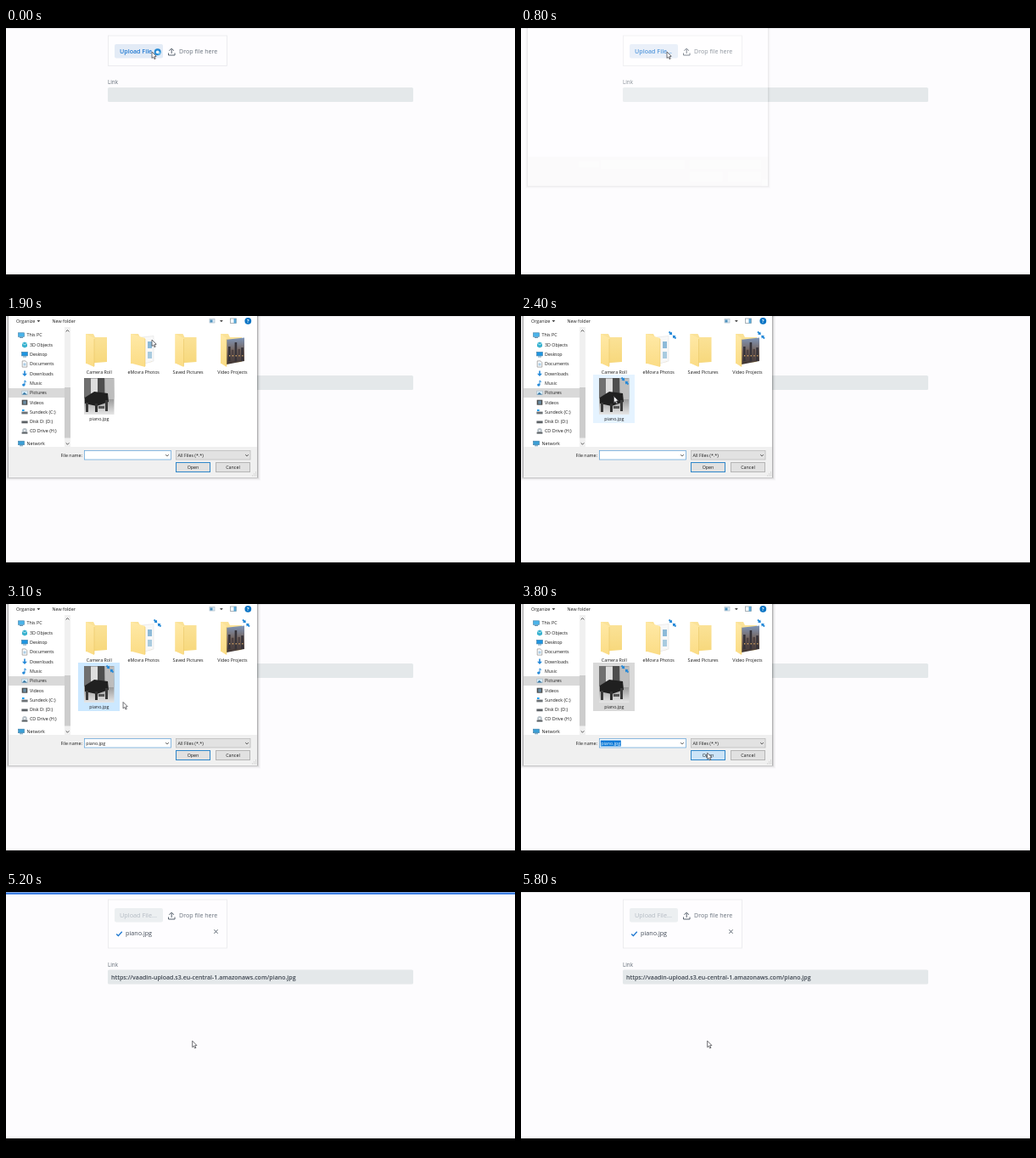
An HTML page with a canvas for the animation above (6100 ms loop, 600 px wide and 306 px high).

```html
<!DOCTYPE html>
<html lang="en">
<head>
<meta charset="utf-8">
<title>File upload</title>
<style>
  html, body { margin: 0; width: 100%; height: 100%; overflow: hidden; background: #fdfcfe; }
  canvas { display: block; width: 600px; height: 306px; }
</style>
</head>
<body>
<canvas id="stage" width="600" height="306"></canvas>
<script>
const ctx = document.getElementById('stage').getContext('2d');
const LOOP = 6100, STEP = 100;
const FONT = '"Open Sans", "Noto Sans", sans-serif';
const BLUE = '#1f78d1';

const clamp = v => Math.max(0, Math.min(1, v));
const span = (t, from, to) => clamp((t - from) / (to - from));
const ease = p => p * p * (3 - 2 * p);
const mix = (a, b, p) => a + (b - a) * p;

function rect(x, y, w, h, fill, stroke, line = 0.7) {
  if (fill) { ctx.fillStyle = fill; ctx.fillRect(x, y, w, h); }
  if (stroke) { ctx.strokeStyle = stroke; ctx.lineWidth = line; ctx.strokeRect(x, y, w, h); }
}

function rounded(x, y, w, h, r, fill) {
  ctx.fillStyle = fill;
  ctx.beginPath();
  ctx.roundRect(x, y, w, h, r);
  ctx.fill();
}

function poly(points, fill, stroke, line = 0.8, close = true) {
  ctx.beginPath();
  points.forEach(([x, y]) => ctx.lineTo(x, y));
  if (close) ctx.closePath();
  if (fill) { ctx.fillStyle = fill; ctx.fill(); }
  if (stroke) { ctx.strokeStyle = stroke; ctx.lineWidth = line; ctx.stroke(); }
}

const path = (points, color, line) => poly(points, null, color, line, false);

function disc(x, y, r, fill) {
  ctx.fillStyle = fill;
  ctx.beginPath();
  ctx.arc(x, y, r, 0, Math.PI * 2);
  ctx.fill();
}

function fade(y, h, ...colors) {
  const gradient = ctx.createLinearGradient(0, y, 0, y + h);
  colors.forEach((color, i) => gradient.addColorStop(i / (colors.length - 1), color));
  return gradient;
}

function text(str, x, y, size, color, weight = 400, align = 'left') {
  ctx.font = `${weight} ${size}px ${FONT}`;
  ctx.textAlign = align;
  ctx.textBaseline = 'alphabetic';
  ctx.fillStyle = color;
  ctx.fillText(str, x, y + size * 0.35);
}

const label = (str, x, y, align) => text(str, x, y, 5.35, '#1c1c1c', 400, align);
const chevron = (x, y, dir, color = '#444') =>
  path([[x - 1.8, y - dir], [x, y + dir], [x + 1.8, y - dir]], color, 0.9);

// ---- page ----

function uploadPanel(t, height) {
  rect(120.5, 9, 140, height, '#fefdff', '#e8e8ec', 0.8);
  const idle = t < 4500;
  rounded(128, 19, 57, 16.5, 2, idle ? '#e3ebf6' : '#eceff1');
  text('Upload File...', 134, 27.3, idle ? 7.1 : 7.3, idle ? BLUE : '#b4bbc3', idle ? 600 : 400);
  path([[191.5, 29.5], [191.5, 32], [199, 32], [199, 29.5]], '#59636f', 1);
  path([[195.2, 30], [195.2, 25]], '#59636f', 1);
  path([[192.4, 26.8], [195.2, 24], [198, 26.8]], '#59636f', 1);
  text('Drop file here', 204, 27.3, 7.1, '#69727d');
}

function fileRow(t) {
  text('piano.jpg', 141, 48.3, 7.2, '#424b57');
  path([[245.4, 44.4], [249.6, 48.8]], '#59636f', 1);
  path([[249.6, 44.4], [245.4, 48.8]], '#59636f', 1);
  if (t >= 5200) {
    path([[130.2, 49.4], [132.4, 51.6], [136.7, 46.7]], BLUE, 1.4);
    return;
  }
  text('Processing File...', 141, 59.8, 6.15, '#6b747f');
  rect(141, 68.4, 99, 1.2, '#d6dade');
  const p = span(t, 4500, 5200);
  rect(141 + 95 * p * p, 68.2, mix(4, 22, Math.sin(p * Math.PI)), 1.7, '#2b91c9');
}

function page(t) {
  rect(0, 0, 600, 306, '#fdfcfe');
  rect(0, 0, 600, 1, '#e7e7ea');
  rect(0, 290, 600, 16, '#000');

  const uploading = t >= 4500 && t < 5200, done = t >= 5200;
  const shift = uploading ? 40.5 : done ? 21.5 : 0;
  uploadPanel(t, 35.5 + shift);
  if (t >= 4500) fileRow(t);
  text('Link', 120, 63.8 + shift, 6.3, '#5f6873', 500);
  rounded(120, 70 + shift, 360, 17, 1.5, '#e4e8ea');
  if (done) {
    text('https://vaadin-upload.s3.eu-central-1.amazonaws.com/piano.jpg', 124, 100.5, 7, '#3a424d', 600);
  }

  if (t >= 4700) {
    ctx.globalAlpha = 1 - span(t, 5200, 5700);
    const width = done ? 600 : 330 * (1 - (1 - span(t, 4600, 5100)) ** 2);
    rect(0, 0.5, width, 2.3, '#2f74e0');
    ctx.globalAlpha = 1;
  }
}

// ---- file dialog ----

const PLACES = ['This PC', '3D Objects', 'Desktop', 'Documents', 'Downloads', 'Music',
  'Pictures', 'Videos', 'Sundeck (C:)', 'Disk D: (D:)', 'CD Drive (H:)'];

function blankIcon(x, y) {
  poly([[x - 2.8, y - 3.6], [x + 1, y - 3.6], [x + 2.8, y - 1.8], [x + 2.8, y + 3.6], [x - 2.8, y + 3.6]],
    '#fff', '#8d8d8d', 0.7);
}

function screenIcon(x, y, color) {
  rect(x - 3.5, y - 2.8, 7, 4.5, color, '#3f7ea6', 0.6);
  rect(x - 2, y + 2.4, 4, 0.8, '#3f7ea6');
}

function pictureIcon(x, y) {
  rect(x - 3.3, y - 2.3, 6.6, 4.6, '#d8ecf8', '#a9b8c2', 0.6);
  poly([[x - 3, y + 2], [x - 0.5, y - 0.6], [x + 3, y + 2]], '#3779a5');
}

const ICONS = [
  (x, y) => screenIcon(x, y, '#4ab4ea'),
  (x, y) => {
    poly([[x, y - 3.5], [x + 3, y - 1.8], [x + 3, y + 2], [x, y + 3.5], [x - 3, y + 2], [x - 3, y - 1.8]], '#39b2cf');
    path([[x - 3, y - 1.8], [x, y], [x + 3, y - 1.8]], '#d9f5fb', 0.7);
  },
  (x, y) => screenIcon(x, y, '#1e96e2'),
  (x, y) => { blankIcon(x, y); rect(x - 1.5, y - 0.8, 3, 0.7, '#4a8fc4'); rect(x - 1.5, y + 1, 3, 0.7, '#4a8fc4'); },
  (x, y) => {
    path([[x, y - 3.3], [x, y + 1]], '#2589d8', 1.6);
    poly([[x - 3, y], [x + 3, y], [x, y + 3.2]], '#2589d8');
  },
  (x, y) => { disc(x - 1.2, y + 2, 1.7, '#2589d8'); path([[x, y + 2], [x, y - 3.2], [x + 2, y - 1.4]], '#2589d8', 1); },
  pictureIcon,
  (x, y) => { rect(x - 3.3, y - 3, 6.6, 6, '#4c4c4c'); rect(x - 1.8, y - 2, 3.6, 4, '#6b8da3'); },
  (x, y) => { rect(x - 3.6, y - 0.4, 7.2, 2.8, '#6b7175'); rect(x - 3, y - 3, 2.6, 2, '#24a0ed'); },
  (x, y) => rect(x - 3.6, y - 0.8, 7.2, 2.8, '#5c6266'),
  (x, y) => { disc(x, y - 0.7, 2.8, '#b7c1c8'); disc(x, y - 0.7, 0.9, '#fff'); rect(x - 3.4, y + 1, 6.8, 2, '#5c6266'); }
];

function sidebar(loaded) {
  rect(3, 85, 66, 11, '#d9d9d9');
  PLACES.forEach((name, i) => {
    const y = 22.6 + i * 11.3, root = i === 0;
    if (loaded) ICONS[i](root ? 18 : 22, y);
    else if (i === 6) pictureIcon(22, y);
    else if (!root) blankIcon(22, y);
    label(name, root ? 24.5 : 28, y);
  });
  if (loaded) screenIcon(18, 150, '#3b9fd6');
  label('Network', 24.5, 150.6);
  rect(69, 13, 7, 141, '#f0f0f0');
  rect(69, 84, 7, 59.5, '#cdcdcd');
  chevron(72.5, 17.5, -0.9);
  chevron(72.5, 150.3, 0.9);
}

function toolbar() {
  label('Organize', 12, 5.8);
  poly([[36.5, 5], [40.3, 5], [38.4, 7.2]], '#444');
  label('New folder', 54.5, 5.8);
  rect(240, 3.5, 6, 4.5, '#dceaf4', '#a3b5c2', 0.6);
  rect(240.5, 4.5, 3, 3, '#4e91bd');
  poly([[252, 5], [255.8, 5], [253.9, 7.2]], '#444');
  rect(264.5, 3, 7, 5.5, '#fff', '#87939c', 0.7);
  rect(268.5, 3, 2.8, 5.5, '#58a8d8');
  disc(285.3, 5.8, 3.9, '#0873c4');
  text('?', 285.3, 5.8, 6, '#fff', 700, 'center');
}

// An open folder: back board, whatever is inside, then the cover on the left.
function folder(x, coverWidth, fillInside) {
  const edge = x + coverWidth;
  poly([[x, 21], [x + 9, 21], [x + 11, 25], [x + 25, 25], [x + 25, 54], [x, 56]], fade(21, 35, '#fbe39a', '#f7d87c'));
  if (fillInside) fillInside(x);
  poly([[x, 21], [edge, 26], [edge, 60], [x, 55.5]], fade(21, 39, '#ffe9a6', '#fbdc85'));
  path([[edge, 27], [edge, 59]], '#e9c766', 0.6);
}

function papers(x) {
  poly([[x + 13, 25], [x + 27, 23.5], [x + 27, 53], [x + 13, 57]], '#f8f8f8', '#ddd', 0.5);
  rect(x + 20, 30, 5, 8, '#8dbad8');
  rect(x + 20, 42, 5, 8, '#a9cbdf');
}

function cityPhoto(x) {
  poly([[x + 5, 28], [x + 28, 25.5], [x + 28, 53], [x + 7, 57]], fade(25, 32, '#7f97bb', '#75645c', '#3c3230'));
  for (let i = 0; i < 5; i++) {
    const top = 36 + 5 * Math.sin(i * 2.3);
    rect(x + 9 + i * 3.8, top, 2.6, 53 - top, i % 2 ? '#4c4142' : '#353239');
    rect(x + 10 + i * 3.8, 46, 1.2, 1.5, '#d9a864');
  }
}

function shrinkArrows(x, y) {
  for (const s of [-1, 1]) {
    path([[x + 4 * s, y + 4 * s], [x + s, y + s]], '#2589d8', 1.8);
    poly([[x + 0.3 * s, y + 0.3 * s], [x + 4 * s, y + 0.7 * s], [x + 0.7 * s, y + 4 * s]], '#2589d8');
  }
}

function pianoPhoto() {
  rect(92, 73, 35.5, 43, fade(73, 43, '#a8a8a8', '#8c8c8c', '#e6e6e6'));
  rect(92, 73, 8, 24, '#707070');
  rect(100, 74, 8, 17, '#dedede');
  rect(108, 73, 8, 18, '#4e4e4e');
  rect(117, 74, 10, 24, '#bdbdbd');
  poly([[93, 96], [104, 89], [120, 91], [121, 101], [107, 106], [93, 103]], '#202020');
  rect(94, 102, 3, 11, '#3a3a3a');
  rect(105, 103, 3, 10, '#303030');
  rect(117, 99, 3, 13, '#3a3a3a');
  rect(109, 106, 7, 3, '#565656');
}

function files(t) {
  folder(94, 10);
  folder(147, 17, papers);
  folder(199.5, 10);
  folder(253, 7, cityPhoto);
  ['Camera Roll', 'eMovra Photos', 'Saved Pictures', 'Video Projects'].forEach((name, i) =>
    label(name, 109.8 + i * 52.4, 66, 'center'));
  if (t >= 2300) {
    const tile = t < 2700 ? '#e5f3ff' : t < 3600 ? '#cce8ff' : '#d9d9d9';
    rect(85, 69, 49, 57, tile);
  }
  if (t >= 1900) pianoPhoto(); else rect(92, 73, 35.5, 43, '#f3f3f3', '#ccc');
  label('piano.jpg', 109.8, 121.5, 'center');
  if (t >= 2000) [[178.5, 22.5], [283, 22.5], [122.5, 76.5]].forEach(p => shrinkArrows(...p));
}

function button(name, x, fill, border) {
  rect(x, 172.5, 40, 11, fill, border, 1);
  label(name, x + 20, 178.2, 'center');
}

function controls(t) {
  label('File name:', 64.5, 164);
  rect(92.5, 158.5, 102, 10.5, '#fff', '#5b9fd6');
  chevron(190, 164, 0.9);
  if (t >= 2700) {
    const marked = t >= 3600;
    if (marked) rect(93.8, 160.5, 24, 7, '#0878d7');
    text('piano.jpg', 94.2, 163.8, 5.35, marked ? '#fff' : '#1c1c1c');
  }
  rect(200.5, 158.5, 87.5, 10.5, '#e2e2e2', '#b5b5b5');
  label('All Files (*.*)', 202.5, 164);
  chevron(284, 164, 0.9);
  button('Open', 200.5, t >= 3500 ? '#cce4f7' : '#e1e1e1', '#2f86c9');
  button('Cancel', 247.5, '#e1e1e1', '#b5b5b5');
  for (let i = 0; i < 3; i++) {
    for (let j = 0; j <= i; j++) rect(294 - j * 2, 183.5 + i * 2, 0.9, 0.9, '#bbb');
  }
}

function unpaintedControls() {
  [[65, 160, 25, 7], [92, 158, 102.5, 11], [200, 158, 88, 11],
    [200, 172, 41, 12], [247, 172, 41, 12], [288, 182, 8, 8]].forEach(b => rect(...b, '#fefefe'));
}

function dialogFrame() {
  for (let i = 0; i < 4; i++) {
    rect(2.5 - i, -20, 294 + 2 * i, 210 + i, null, `rgba(0,0,0,${0.3 / (1 + i * i)})`, 1);
  }
  rect(3, -20, 293, 210, '#fff');
  rect(3, 154, 293, 35.6, '#f0f0f0');
}

function dialog(t) {
  const opening = span(t, 700, 1100), closing = span(t, 3800, 4100);
  const alpha = opening * (1 - closing);
  if (!alpha) return;
  const scale = mix(0.96, 1, ease(Math.min(opening, 1 - closing)));
  ctx.save();
  ctx.globalAlpha = alpha;
  ctx.translate(150, 80);
  ctx.scale(scale, scale);
  ctx.translate(-150, -80);
  dialogFrame();
  if (t >= 1500) sidebar(t >= 1700);
  if (t >= 1600) { toolbar(); controls(t); } else unpaintedControls();
  if (t >= 1800) files(t);
  ctx.restore();
}

// ---- pointer ----

function pointer(t) {
  const toFile = ease(span(t, 1900, 2400)), toOpen = ease(span(t, 2900, 3500));
  const x = mix(mix(172, 109.5, toFile), 219.7, toOpen);
  const y = mix(mix(28, 94.5, toFile), 175.2, toOpen);
  const shape = [[0, 0], [0, 7.5], [1.7, 6], [3, 8.7], [4.2, 8.1], [3, 5.5], [5.2, 5.3]];
  poly(shape.map(([dx, dy]) => [x + dx, y + dy]), '#fff', '#4b4b50', 0.8);
  if (t >= 400) return;
  disc(178.7, 28.3, 4, '#2488d2');
  disc(178.7, 28.3, 1.9, '#eaf5fc');
  ctx.beginPath();
  const a = t / 400 * Math.PI * 2;
  ctx.arc(178.7, 28.3, 2.9, a, a + 1.3);
  ctx.strokeStyle = '#70c3ef';
  ctx.lineWidth = 1.6;
  ctx.stroke();
}

function frame(now) {
  const t = Math.floor((now % LOOP) / STEP) * STEP;
  page(t);
  dialog(t);
  pointer(t);
  requestAnimationFrame(frame);
}
requestAnimationFrame(frame);
</script>
</body>
</html>
```
